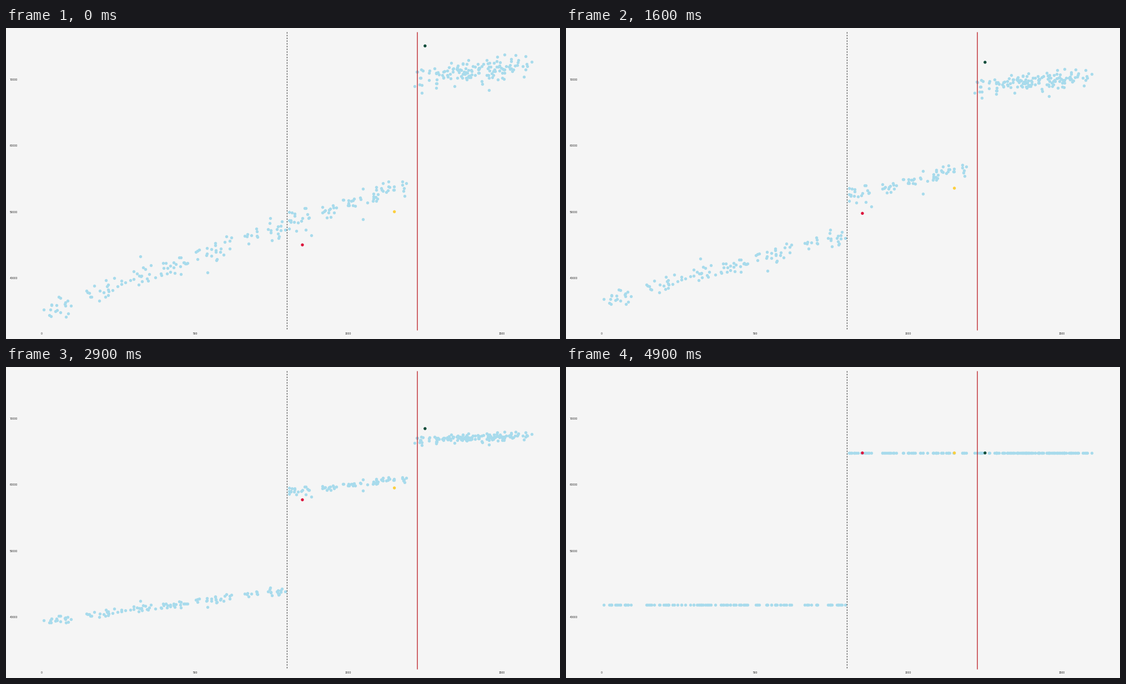
A matplotlib script that plays this animation: 998 px wide and 561 px high, repeating every 10000 ms.

```python
import numpy as np
import matplotlib.pyplot as plt
from matplotlib.animation import FuncAnimation

W, H, DPI = 998, 561, 64
PX = 72 / DPI               # points per pixel
FRAMES, INTERVAL = 100, 100
MOVE = 49                   # frames until the dots settle
LOW, HIGH = 41880, 64740    # resting values of the two groups
BLUE = "#a8dbec"
DOT = 5.4

rng = np.random.default_rng(7)


def sx(v):
    return 64.5 + v * 0.5523


def sy(v):
    return 92.1 + (70000 - v) * 0.011965


def cloud(n, lo, hi, start, end, sd):
    """Random dots along a straight trend from start to end."""
    x = rng.uniform(lo, hi, n)
    y = start + (end - start) * (x - lo) / (hi - lo)
    noise = np.clip(rng.normal(0, sd, n), -2.2 * sd, 2.2 * sd)
    return np.column_stack([x, y + noise])


low = np.vstack([
    cloud(19, 5, 95, 35400, 36600, 1000),
    cloud(83, 143, 628, 37300, 45300, 850),
    cloud(24, 655, 800, 46100, 48200, 800),
    [(321, 43300), (540, 40800)],
])
high = np.vstack([
    cloud(20, 801, 880, 48300, 49500, 900),
    cloud(51, 907, 1150, 49900, 53600, 650),
    cloud(6, 1174, 1190, 53600, 54200, 900),
    cloud(142, 1210, 1598, 70500, 71900, 950),
    [(879, 46400), (1048, 48900), (1239, 67950), (1458, 68300)],
])
special = np.array([(850, 45000), (1150, 50000), (1250, 75000)])

fig = plt.figure(figsize=(W / DPI, H / DPI), dpi=DPI, facecolor="#f5f5f5")
ax = fig.add_axes([0, 0, 1, 1])
ax.set(xlim=(0, W), ylim=(H, 0))
ax.axis("off")


def dots(data, color):
    return ax.scatter(sx(data[:, 0]), sy(data[:, 1]), s=(DOT * PX) ** 2,
                      c=color, linewidths=0, zorder=2)


groups = [
    (dots(low, BLUE), low, LOW),
    (dots(high, BLUE), high, HIGH),
    (dots(special, ["#dc143c", "#fccf3e", "#0f4c3a"]), special, HIGH),
]

ax.plot([sx(800)] * 2, [7.5, 545.5], color="#1a1a1a", lw=0.95 * PX,
        dashes=(2.7, 2.5), dash_capstyle="butt", zorder=4, snap=False)
ax.plot([sx(1225)] * 2, [7.5, 545.5], color="#bb1a20", lw=1.3 * PX,
        solid_capstyle="butt", zorder=4, snap=False)

label = dict(family="Liberation Sans", size=5.05 * PX, color="#262626",
             va="center_baseline")
for v in range(40000, 70001, 10000):
    ax.text(21.5, sy(v) + 0.4, str(v), ha="right", **label)
for v in range(0, 1501, 500):
    ax.text(sx(v), 551, str(v), ha="center", **label)


def draw(i):
    t = min(i, MOVE) / MOVE
    ease = (1 - np.cos(np.pi * t)) / 2
    for artist, data, rest in groups:
        v = data[:, 1] + (rest - data[:, 1]) * ease
        artist.set_offsets(np.column_stack([sx(data[:, 0]), sy(v)]))
    return [g[0] for g in groups]


anim = FuncAnimation(fig, draw, frames=FRAMES, interval=INTERVAL,
                     init_func=lambda: draw(0), repeat=True, repeat_delay=0)
plt.show()
```
